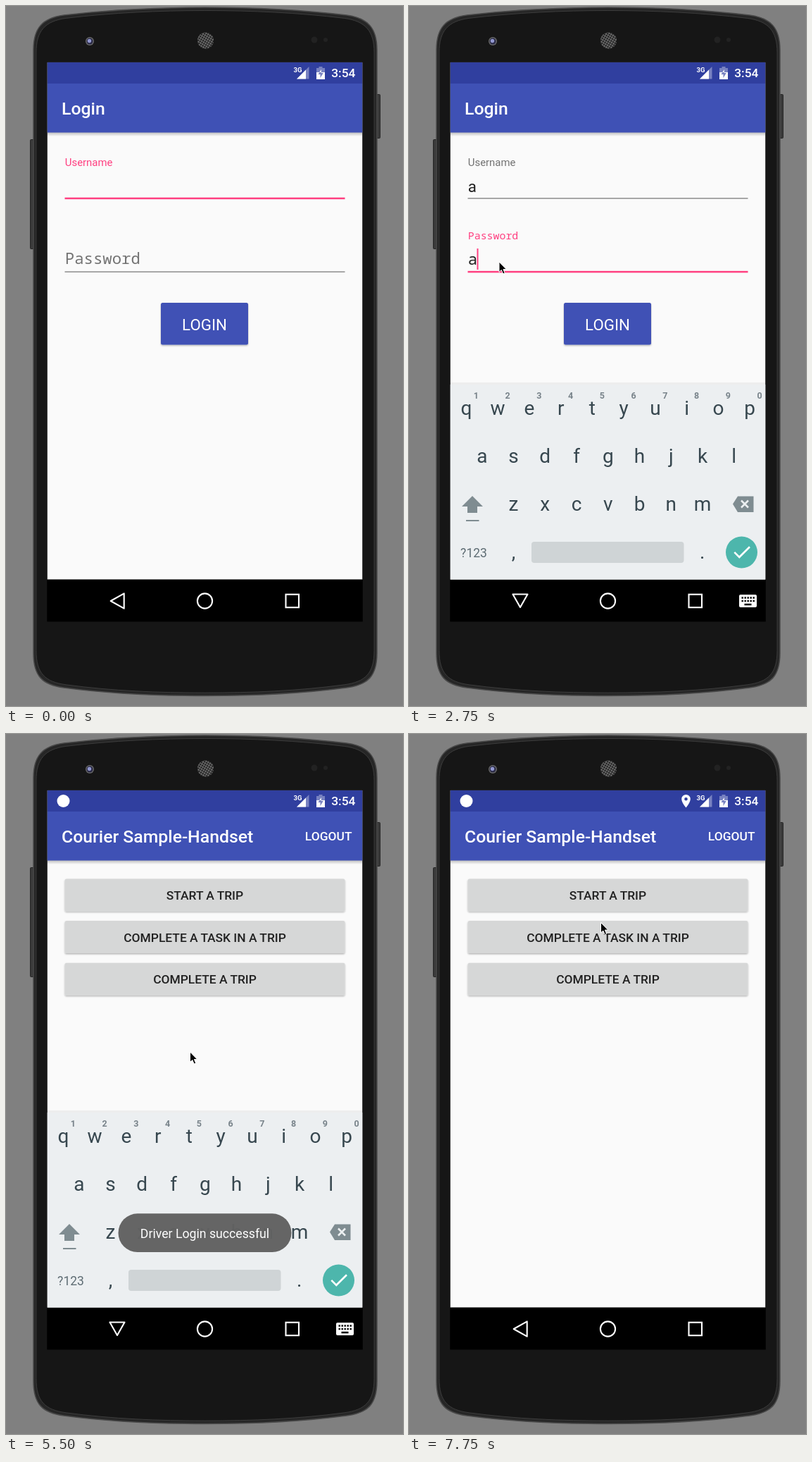
Write an HTML page that moves like this. It is 564 by 993 pixels and loops after 8000 ms.

```html
<!DOCTYPE html>
<html lang="en">
<head>
<meta charset="utf-8">
<title>Login demo</title>
<style>
  html, body { margin: 0; width: 100%; height: 100%; overflow: hidden; background: #808080; }
  svg { display: block; font-family: Roboto, sans-serif; }
  .mono { font-family: "Noto Sans Mono", monospace; }
  .mid { text-anchor: middle; }
  .end { text-anchor: end; }
  .title { font-size: 24.8px; font-weight: 500; fill: #fff; }
  .input { font-size: 22.3px; }
  .small { font-size: 17.4px; font-weight: 500; }
</style>
</head>
<body>
<svg width="564" height="993" viewBox="0 0 564 993">
  <defs>
    <linearGradient id="shade" x2="0" y2="1">
      <stop stop-opacity=".25"/><stop offset="1" stop-opacity="0"/>
    </linearGradient>
    <pattern id="mesh" width="3.2" height="3.2" patternUnits="userSpaceOnUse" patternTransform="rotate(30)">
      <rect width="3.2" height="3.2" fill="#6c6c6c"/><circle cx="1.6" cy="1.6" r="1.2" fill="#161616"/>
    </pattern>
    <filter id="drop" x="-10%" y="-20%" width="120%" height="150%">
      <feDropShadow dx="0" dy="1.3" stdDeviation="1.1" flood-opacity=".3"/>
    </filter>
    <clipPath id="screen"><rect x="58.5" y="79.7" width="448" height="793.6"/></clipPath>
    <path id="body" d="M39 62C39 31 52 17 82 13C150 5 215 2 283 2S416 5 484 13C514 17 527 31 527 62V918C527 951 514 963 484 967C416 976 351 978.5 283 978.5S150 976 82 967C52 963 39 951 39 918Z"/>
    <g id="bars">
      <rect x="58.5" y="79.7" width="448" height="734" fill="#fafafa"/>
      <rect x="58.5" y="179" width="448" height="6" fill="url(#shade)"/>
      <rect x="58.5" y="79.7" width="448" height="30.3" fill="#303f9f"/>
      <rect x="58.5" y="110" width="448" height="69.5" fill="#3f51b5"/>
    </g>
  </defs>

  <rect width="564" height="993" fill="#808080"/>
  <g fill="#3a3a3a" stroke="#262626">
    <rect x="34.5" y="189.5" width="6" height="155" rx="1"/>
    <rect x="525.5" y="125.5" width="6" height="62" rx="1"/>
  </g>
  <use href="#body" fill="#262626" stroke="#4a4a4a" stroke-width="1.5"/>
  <use href="#body" fill="#161616" stroke="#3c3c3c" transform="translate(4.5 4.5) scale(.984 .991)"/>
  <circle cx="119" cy="50" r="6" fill="#666"/>
  <circle cx="119" cy="50" r="4.5" fill="#2b2b48"/>
  <circle cx="118.5" cy="49.5" r="2.7" fill="#9298d0"/>
  <circle cx="283.5" cy="49" r="11.5" fill="url(#mesh)"/>
  <circle cx="438" cy="48" r="4.5" fill="#222"/>
  <circle cx="454" cy="48" r="3" fill="#222"/>

  <g clip-path="url(#screen)">
    <rect x="58" y="79" width="449" height="795"/>

    <g id="login">
      <use href="#bars"/>
      <text class="title" x="79" y="153.5">Login</text>
      <text id="userLabel" x="83.8" y="227" font-size="14.9">Username</text>
      <text id="userText" class="input" x="83.8" y="264" fill="#212121">a</text>
      <rect id="userLine" x="83.5" width="398"/>
      <text id="passLabel" class="mono" x="83.8">Password</text>
      <text id="passText" class="input mono" x="83.8" y="367" fill="#212121">a</text>
      <circle id="passDot" cx="90.3" cy="359.3" r="2.8" fill="#212121"/>
      <rect id="passLine" x="83.5" width="398"/>
      <rect id="caret" width="2" height="30" fill="#ff4081"/>
      <rect x="220" y="421" width="124" height="59.5" rx="2.5" fill="#3f51b5" filter="url(#drop)"/>
      <text class="input mid" x="282" y="460" fill="#fff">LOGIN</text>
      <rect id="dim" x="58.5" y="79.7" width="448" height="734" opacity=".4"/>
    </g>

    <g id="home">
      <use href="#bars"/>
      <text class="title" x="79" y="153.5">Courier Sample-Handset</text>
      <text class="small end" x="491.5" y="151" fill="#fff">LOGOUT</text>
      <g id="actions"></g>
    </g>

    <g fill="#fff">
      <circle id="notice" cx="81.5" cy="95" r="9"/>
      <path id="pin" fill-rule="evenodd" d="M393.5 104.5C389.5 99.5 387.2 95.5 387.2 92.3A6.3 6.3 0 0 1 399.8 92.3C399.8 95.5 397.5 99.5 393.5 104.5ZM393.5 90A2.3 2.3 0 1 0 393.5 94.6A2.3 2.3 0 1 0 393.5 90Z"/>
      <text x="408.5" y="94" font-size="9.5" font-weight="700">3G</text>
      <path d="M413 103.5L430.5 86V103.5Z" opacity=".35"/>
      <path d="M413 103.5L426 90.5V103.5Z"/>
      <path d="M441 88H444.5V86H449.5V88H453V104H441Z" opacity=".35"/>
      <path fill-rule="evenodd" d="M441 94H453V104H441ZM447.8 90L443.5 97H446.5V102L450.8 95H447.8Z"/>
      <text class="small end" x="496.5" y="101">3:54</text>
    </g>

    <rect x="58" y="813.6" width="449" height="60"/>
    <g id="keyboard">
      <rect x="58.5" y="534" width="448" height="3" opacity=".05"/>
      <rect x="58.5" y="537" width="448" height="276.6" fill="#eceff1"/>
      <g id="keys" class="mid" fill="#37474f"></g>
      <text class="mid" x="92" y="781.5" font-size="17.5" fill="#5f6d74">?123</text>
      <rect x="174" y="760" width="216.5" height="30" rx="4" fill="#cfd4d6"/>
      <path fill="#7f8c91" d="M90 695L105 710H97V719H83V710H75ZM81 729H99.5V731H81Z"/>
      <path fill="#7f8c91" d="M460 706.5L467 695.5H489.5V718H467Z"/>
      <path d="M472 701.5L482 711.5M482 701.5L472 711.5" stroke="#eceff1" stroke-width="2.5"/>
      <circle cx="472.5" cy="775" r="22.5" fill="#4db6ac"/>
      <path d="M462.3 774.8L469.3 781.8L484 767.3" fill="none" stroke="#fff" stroke-width="2.6"/>
    </g>

    <g fill="none" stroke="#fff" stroke-width="2.1">
      <path id="back" stroke-linejoin="round"/>
      <circle cx="282.5" cy="844" r="10.6"/>
      <rect x="397.5" y="834.7" width="18.5" height="18.5"/>
    </g>
    <g id="kbIcon">
      <rect x="469" y="835" width="25" height="18" rx="2" fill="#fff"/>
      <path d="M472.5 839.5H491M472.5 844H491" stroke="#000" stroke-width="2.4" stroke-dasharray="2.4 1.6"/>
      <path d="M476.5 849H486.5" stroke="#000" stroke-width="2.4"/>
    </g>

    <g id="toast">
      <rect x="159.5" y="680.3" width="246" height="54.7" rx="27.3" fill="#616161"/>
      <text class="mid" x="282.5" y="714.5" font-size="17.7" fill="#fff">Driver Login successful</text>
    </g>
  </g>

  <path id="pointer" stroke="#fff" d="M0 0V14.5L3.3 11.5L5.7 17L8.2 16L5.9 10.6H10.3Z"/>
</svg>

<script>
const LOOP = 8000, STEP = 250;
const PINK = '#ff4081', GREY = '#737373';
const el = {};
for (const node of document.querySelectorAll('[id]')) el[node.id] = node;

const set = (id, attrs) => {
  for (const name in attrs) el[id].setAttribute(name, attrs[name]);
};
const show = (id, visible) => set(id, { display: visible ? 'inline' : 'none' });
const text = (x, y, size, label, extra = '') =>
  `<text x="${x}" y="${y}" font-size="${size}" ${extra}>${label}</text>`;

// Key rows are centred on a grid of ten columns.
const KEY = 44.75;
el.keys.innerHTML = [['qwertyuiop', 0, 580], ['asdfghjkl', .5, 648], ['zxcvbnm', 1.5, 716]]
  .map(([row, shift, y]) => [...row]
    .map((letter, i) => text(59 + KEY * (i + shift + .5), y, 28, letter)).join(''))
  .join('') +
  [...'1234567890'].map((digit, i) =>
    text(95.3 + KEY * i, 556.5, 12.5, digit, 'font-weight="700" fill="#78838a"')).join('') +
  text(148.4, 784, 28, ',') + text(416.6, 784, 28, '.');

el.actions.innerHTML = ['START A TRIP', 'COMPLETE A TASK IN A TRIP', 'COMPLETE A TRIP']
  .map((label, i) => `<g transform="translate(0 ${i * 59.6})">
    <rect x="83.5" y="205.5" width="398" height="46" rx="2.5" fill="#d6d7d7" filter="url(#drop)"/>
    <text class="small mid" x="282.5" y="235" fill="#212121">${label}</text></g>`).join('');

// Pointer stops: time, x, y.
const path = [
  [250, 6, 960], [750, 261, 143], [1250, 200, 250], [2000, 128, 363],
  [3500, 128, 363], [4500, 261.5, 451], [7250, 261.5, 451], [7750, 272.5, 267.5], [LOOP, 272.5, 267.5]
];
function pointerAt(t) {
  const i = Math.max(1, path.findIndex(stop => stop[0] > t));
  const [t0, x0, y0] = path[i - 1], [t1, x1, y1] = path[i];
  const k = (t - t0) / (t1 - t0);
  return [x0 + (x1 - x0) * k, y0 + (y1 - y0) * k];
}

function underline(id, y, focused) {
  const height = focused ? 2.5 : 1.2;
  set(id, { y: y - height / 2, height, fill: focused ? PINK : GREY });
}

function draw(t) {
  const within = (from, to) => t >= from && t < to;

  const onPassword = t >= 2500;
  set('userLabel', { fill: onPassword ? GREY : PINK });
  show('userText', t >= 1500);
  underline('userLine', 272.9, !onPassword);
  underline('passLine', 377.1, t >= 2250);

  const lift = t < 2500 ? 0 : t < 2750 ? .7 : 1;
  set('passLabel', { y: 366 - 35 * lift, 'font-size': 22.3 - 7.4 * lift, fill: lift ? PINK : GREY });
  show('passText', within(2750, 4000));
  show('passDot', t >= 4000);

  show('caret', within(500, 1000) || within(1500, 2000) || within(2250, 3250) || within(3750, 4250));
  const typed = within(1500, 2250) || t >= 2750;
  set('caret', { x: typed ? 96.5 : 83.5, y: t < 2250 ? 241 : 344 });

  const leaving = within(5250, 5500);
  show('login', t < 5500);
  show('dim', leaving);
  set('login', { transform: leaving ? 'translate(28.25 79) scale(.9)' : '' });
  show('home', t >= 5250);
  set('home', { transform: `translate(0 ${leaving ? 432 : 0})`, opacity: leaving ? .78 : 1 });
  show('notice', t >= 5250);
  show('pin', t >= 5750);

  const sliding = within(2500, 2750) || within(5750, 6000);
  show('keyboard', within(2500, 6000));
  set('keyboard', { transform: `translate(0 ${sliding ? 31 : 0})`, opacity: sliding ? .43 : 1 });
  const typing = within(2500, 5750);
  show('kbIcon', typing);
  set('back', { d: typing ? 'M147.5 834.5H168.5L158 853Z' : 'M148.7 844L167.7 833.3V854.7Z' });

  show('toast', within(5250, 7000));
  set('toast', { opacity: leaving ? .25 : t < 6500 ? .97 : t < 6750 ? .75 : .3 });

  show('pointer', t >= 250);
  set('pointer', { transform: `translate(${pointerAt(t)})` });
}

const start = performance.now();
function tick() {
  const t = (performance.now() - start) % LOOP;
  draw(Math.floor(t / STEP) * STEP);
  requestAnimationFrame(tick);
}
tick();
</script>
</body>
</html>
```
